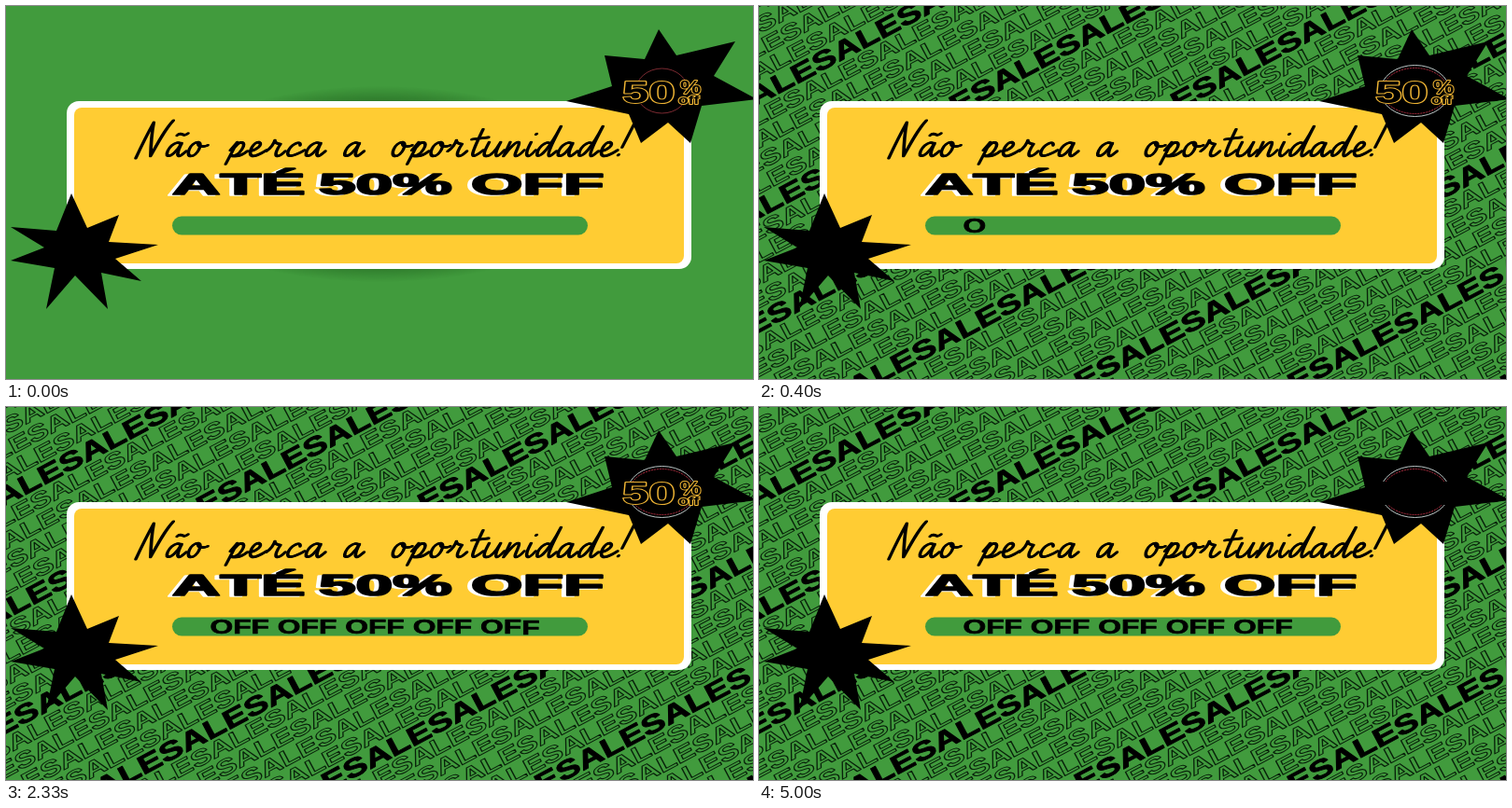
An HTML page with a canvas for the animation above (5030 ms loop, 800 by 400 pixels).

```html
<!DOCTYPE html>
<html lang="pt">
<head>
<meta charset="utf-8">
<title>Até 50% off</title>
<style>
html, body { margin: 0; width: 100%; height: 100%; overflow: hidden; background: #419b3d; }
canvas { display: block; }
</style>
</head>
<body>
<canvas id="stage" width="800" height="400" role="img" aria-label="Não perca a oportunidade! Até 50% off"></canvas>
<script>
const LOOP = 5030;
const GREEN = '#419b3d', YELLOW = '#ffcc33', GOLD = '#eeb434';
const stage = document.getElementById('stage').getContext('2d');

// Handwriting strokes: advance width and path, baseline at 0
const SCRIPT = {
  N: [32, 'M3 2C6-12 9-24 12-34C13-20 16-8 18 0C22-14 26-28 32-36'],
  a: [22, 'M15-12C8-18 0-6 3-1C7 2 13-6 15-13C14-8 12-1 16 0C18 0 20-3 22-5'],
  o: [20, 'M10-14C2-14 0-1 6 0C13 0 16-13 10-14C11-9 17-9 21-11'],
  p: [20, 'M2-6L7-14L1 8M6-9C10-17 17-14 14-7C12-1 6 1 4-1C10 1 16-1 20-5'],
  e: [20, 'M2-5C10-6 15-12 10-14C4-15 0-2 7 0C12 0 16-3 20-6'],
  r: [20, 'M0-5C4-8 6-13 6-16C7-12 11-13 13-12C11-8 9-1 13 0C16 0 18-3 20-5'],
  c: [20, 'M14-11C13-17 3-11 3-4C3 2 11 0 20-6'],
  t: [17, 'M11-27C9-18 6-6 7-2C8 2 13-2 17-6M2-17L19-19'],
  u: [22, 'M4-14C2-7 0 0 5 0C10 0 14-8 16-14C14-7 13-1 16 0C18 0 20-3 22-6'],
  n: [21, 'M4-14L1 0C5-8 10-15 13-14C16-12 10-1 14 0C17 0 19-3 21-6'],
  i: [12, 'M5-14C3-7 2-1 6 0C8 0 10-3 12-6M8-22L8.5-22.5'],
  d: [22, 'M14-12C8-18 0-6 3-1C7 2 14-8 20-30C17-18 12-1 16 0C18 0 20-3 22-5'],
  '!': [15, 'M10-32L4-9M2-1L2.5-1.5']
};
SCRIPT['ã'] = [22, SCRIPT.a[1] + 'M8-21C12-26 14-18 19-23'];

function setFont(g, size) {
  g.font = `bold ${size}px "Liberation Sans", Arial, sans-serif`;
  g.fontKerning = 'none';
}

// Wide lettering, optionally filled and outlined
function wide(g, text, x, y, size, scale, fill, line, width = 1) {
  g.save();
  g.translate(x, y);
  g.scale(scale, 1);
  setFont(g, size);
  g.lineJoin = 'round';
  if (line) {
    g.strokeStyle = line;
    g.lineWidth = width;
    g.strokeText(text, 0, 0);
  }
  if (fill) {
    g.fillStyle = fill;
    g.fillText(text, 0, 0);
  }
  g.restore();
}

function box(g, x, y, w, h, r, fill) {
  g.beginPath();
  g.roundRect(x, y, w, h, r);
  g.fillStyle = fill;
  g.fill();
}

function star(g, points) {
  g.fillStyle = '#000';
  g.fill(new Path2D(`M${points}Z`));
}

function layer(draw) {
  const c = document.createElement('canvas');
  c.width = 800;
  c.height = 400;
  draw(c.getContext('2d'));
  return c;
}

// Diagonal rows: one solid, then four outlined
const pattern = layer(g => {
  const slope = 0.53;
  const shifts = [58, 46, 10, 74, 89, 44, 20];
  for (let k = -4; k < 35; k++) {
    const solid = k % 5 === 0;
    g.save();
    g.translate(0, 94 + 24.5 * k);
    g.rotate(-Math.atan(slope));
    const text = 'SALE'.repeat(12);
    if (solid && k >= 0) {
      const shift = shifts[k / 5] * Math.hypot(1, slope);
      wide(g, text, shift - 103, 10, 28, 1.38, '#000', '#000', 0.9);
    } else {
      wide(g, text, k * 31 % 90 - 90, 8.5, 24, 1.4, null, '#08200a', 1);
    }
    g.restore();
  }
});

const shadow = layer(g => {
  g.translate(400, 191);
  g.scale(250, 105);
  const fade = g.createRadialGradient(0, 0, 0.75, 0, 0, 1);
  fade.addColorStop(0, 'rgba(0,40,0,.45)');
  fade.addColorStop(1, 'rgba(0,40,0,0)');
  g.fillStyle = fade;
  g.fillRect(-1, -1, 2, 2);
});

// Slanted broad pen
function handwrite(g, word, x) {
  g.save();
  g.transform(1.02, 0, -0.28, 1.06, x, 161);
  g.lineWidth = 2.5;
  g.lineCap = g.lineJoin = 'round';
  g.strokeStyle = '#000';
  for (const ch of word) {
    const [advance, path] = SCRIPT[ch];
    const stroke = new Path2D(path);
    g.stroke(stroke);
    g.translate(1, 0);
    g.stroke(stroke);
    g.translate(advance - 1, 0);
  }
  g.restore();
}

const card = layer(g => {
  box(g, 65, 102, 669, 180, 13, '#fff');
  box(g, 73, 109, 653, 167, 8, YELLOW);
  handwrite(g, 'Não', 136);
  handwrite(g, 'perca', 236);
  handwrite(g, 'a', 359);
  handwrite(g, 'oportunidade!', 410);
  for (const [dx, dy, color] of [[-5, 1, '#fff'], [0, 0, '#000']]) {
    const title = (text, x) => wide(g, text, x + dx, 201.6 + dy, 31.8, 2.24, color, color, 1.7);
    title('ATÉ', 178);
    title('50%', 335);
    title('OFF', 498);
  }
  box(g, 178, 225.5, 445, 20, 10, GREEN);
  star(g, '70 201L87 238L121 224L110 253L163 256L117 271L145 295L102 286L109 325L74 289L43 325L52 281L5 273L41 259L5 237L54 241');
  star(g, '699 25L718 53L781 38L758 75L804 100L745 107L733 147L709 125L680 147L667 116L600 102L649 86L641 53L684 57');
});

// Each letter appears a little low and settles
function ticker(g, t) {
  const scale = 1.426, size = 22.3;
  g.save();
  g.beginPath();
  g.rect(178, 225, 445, 21);
  g.clip();
  setFont(g, size);
  let x = 218.4, n = 0;
  for (const ch of 'OFF OFF OFF OFF OFF') {
    if (ch !== ' ') {
      const age = t - 280 - 140 * n++;
      const y = 243 + 5 * Math.exp(-age / 40);
      if (age >= 0) wide(g, ch, x, y, size, scale, '#000', '#000', 0.6);
    }
    x += g.measureText(ch).width * scale;
  }
  g.restore();
}

function ring(g, rx, ry, color, dash) {
  g.beginPath();
  g.ellipse(702.5, 91, rx, ry, 0, 0, 7);
  g.strokeStyle = color;
  g.setLineDash(dash);
  g.stroke();
}

function badge(g, t) {
  const phase = t % 467;
  g.save();
  g.beginPath();
  g.rect(660, 60, 85, 20);
  g.rect(660, 105, 85, 16);
  g.clip();
  g.lineWidth = 1;
  if (phase < 160) {
    ring(g, 28, 24, '#7b2a31', []);
  } else if (phase > 325) {
    ring(g, 37, 27.5, '#b9c4c4', []);
    ring(g, 35, 24.5, '#b52d40', [2, 1]);
  }
  g.restore();

  g.save();
  g.globalAlpha = Math.max(0, Math.min(1, (4970 - t) / 270));
  wide(g, '50', 660, 104, 34, 1.5, '#000', GOLD, 2);
  wide(g, '%', 722, 94, 20, 1.25, '#000', GOLD, 1.8);
  wide(g, 'off', 720, 104.5, 12.5, 1.4, '#000', GOLD, 1.8);
  g.restore();
}

const start = performance.now();
function frame() {
  const t = (performance.now() - start) % LOOP;
  const reveal = Math.max(0, Math.min(1, (t - 20) / 130));
  stage.fillStyle = GREEN;
  stage.fillRect(0, 0, 800, 400);
  stage.globalAlpha = 1 - reveal;
  stage.drawImage(shadow, 0, 0);
  stage.globalAlpha = reveal;
  stage.drawImage(pattern, 0, 0);
  stage.globalAlpha = 1;
  stage.drawImage(card, 0, 0);
  ticker(stage, t);
  badge(stage, t);
  requestAnimationFrame(frame);
}
frame();
</script>
</body>
</html>
```
